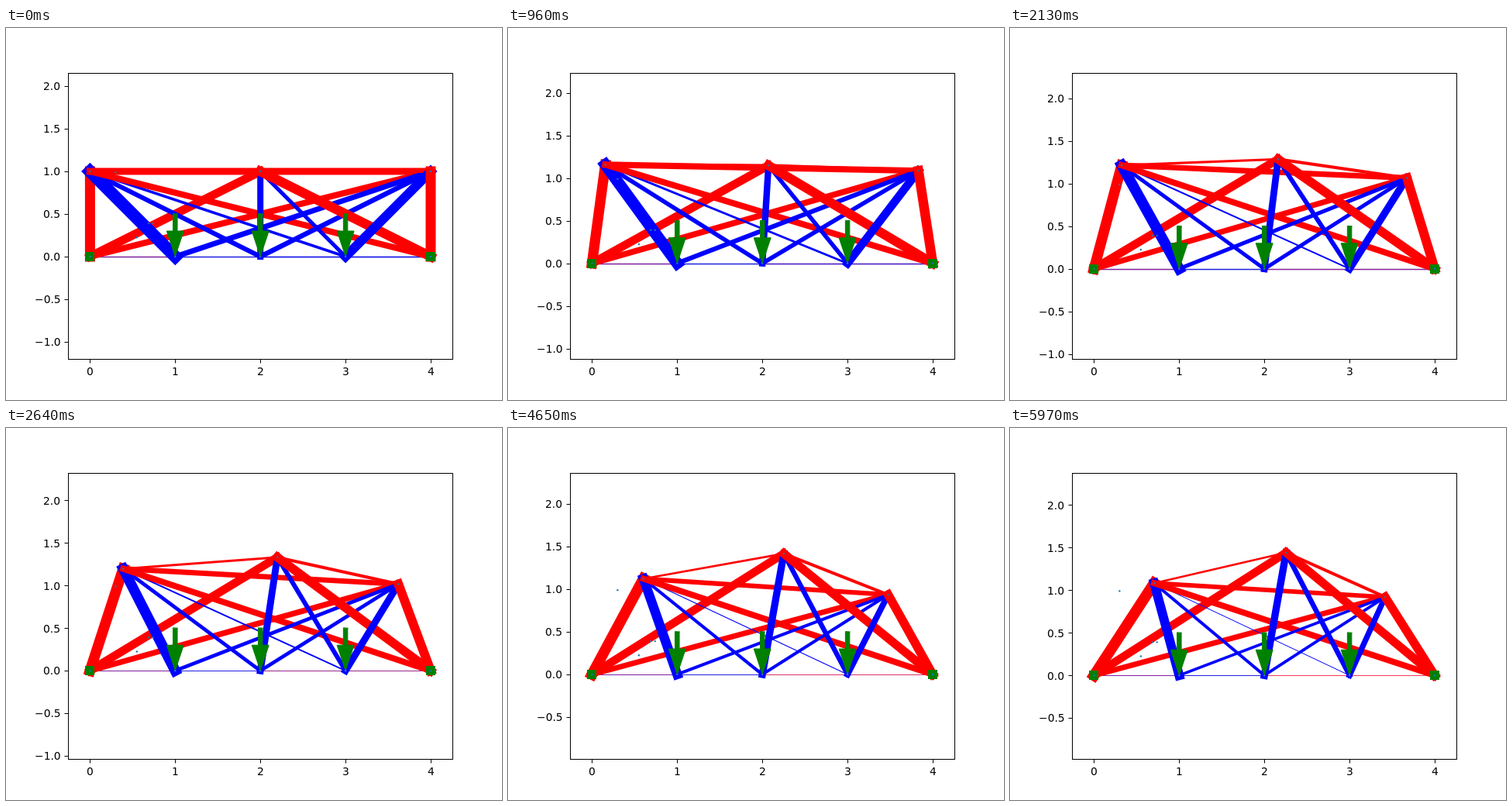
These frames come from a looping animation (640 by 480 pixels, 6 s). An HTML page with a canvas:

```html
<!DOCTYPE html>
<html>
<head>
<meta charset="utf-8">
<style>
html, body { margin: 0; width: 640px; height: 480px; overflow: hidden; background: #fff; }
canvas { display: block; }
</style>
</head>
<body>
<canvas id="stage" width="640" height="480"></canvas>
<script>
const ctx = document.getElementById('stage').getContext('2d');
const UNIT = 109.9, LOOP = 6000, STEP = 30;

// Key points of the free joints, in axis units
const paths = {
  A: [[0, 1], [.235, 1.21], [.47, 1.17], [.706, 1.083]],
  B: [[2, 1], [2.11, 1.218], [2.235, 1.376], [2.255, 1.441]],
  C: [[4, 1], [3.754, 1.105], [3.561, .968], [3.418, .92]]
};

// Bars in painting order: ends, colour, first and last width
const bars = [
  ['0A', 'red', 13, 14], ['0B', 'red', 11, 10.5], ['0C', 'red', 8, 7],
  ['A1', 'blue', 16, 12], ['A2', 'blue', 6, 4], ['AB', 'red', 4, 2.5],
  ['A3', 'blue', 3.5, 1], ['A4', 'red', 8, 8], ['AC', 'red', 9, 5.8],
  ['1C', 'blue', 7, 3.6], ['2B', 'blue', 8, 9.4], ['2C', 'blue', 6.4, 3.8],
  ['B3', 'blue', 5, 6.5], ['B4', 'red', 12.5, 11], ['BC', 'red', 4, 4],
  ['3C', 'blue', 12, 7.3], ['4C', 'red', 13, 11.3]
];
const specks = [[.3, .99], [.55, .225], [.69, .39], [.74, .39]];

const mix = (a, b, f) => a + (b - a) * f;
const easeOut = (f, bend) => f * (1 + bend - bend * f);
const snap = v => Math.round(v) + .5;

// Catmull-Rom spline through evenly spaced values, s from 0 to 1
function spline(v, s) {
  const n = v.length - 1, i = Math.min(n - 1, Math.floor(s * n)), f = s * n - i;
  const a = v[i], b = v[i + 1];
  const m0 = i ? (b - v[i - 1]) / 2 : b - a;
  const m1 = i < n - 1 ? (v[i + 2] - a) / 2 : b - a;
  return mix(a, b, f * f * (3 - 2 * f)) + f * (1 - f) * (m0 * (1 - f) - m1 * f);
}

function line(x1, y1, x2, y2, color, width) {
  ctx.strokeStyle = color;
  ctx.lineWidth = width;
  ctx.beginPath();
  ctx.moveTo(x1, y1);
  ctx.lineTo(x2, y2);
  ctx.stroke();
}

function draw(t) {
  const move = easeOut(t / (LOOP - STEP), .45);
  const load = easeOut(move, .4);

  const nodes = {};
  for (let i = 0; i < 5; i++) nodes[i] = [i, 0];
  for (const name in paths)
    nodes[name] = [0, 1].map(axis => spline(paths[name].map(p => p[axis]), move));

  // The view stays centred on the height of the truss
  const peak = Math.max(nodes.A[1], nodes.B[1], nodes.C[1]);
  const base = 242.6 + 110 * (peak / 2 - .024);
  const X = x => 328.2 + UNIT * (x - 2);
  const Y = y => base - UNIT * y;

  ctx.fillStyle = '#fff';
  ctx.fillRect(0, 0, 640, 480);

  ctx.save();
  ctx.beginPath();
  ctx.rect(80, 58, 496, 369);
  ctx.clip();

  const chord = (a, b, color) =>
    line(X(a), snap(base), X(b), snap(base), color, mix(1.6, 1, load));
  ctx.lineCap = 'butt';
  chord(0, 1, '#8020a0');
  chord(1, 2, '#2020e0');
  chord(2, 4, `rgb(${240 * load}, ${60 * load}, ${mix(230, 90, load)})`);

  ctx.lineCap = 'square';
  for (const [ends, color, first, last] of bars) {
    const [p, q] = [...ends].map(name => nodes[name]);
    line(X(p[0]), Y(p[1]), X(q[0]), Y(q[1]), color, mix(first, last, load));
  }

  ctx.fillStyle = ctx.strokeStyle = 'green';
  ctx.lineWidth = 1;
  for (const x of [0, 4]) ctx.fillRect(Math.round(X(x)) - 6, Math.round(base) - 6, 12, 12);
  for (const x of [1, 2, 3]) {
    const half = [[.025, .5], [.025, .3], [.1, .3], [0, 0]];
    const mirror = half.slice(0, 3).reverse().map(([dx, y]) => [-dx, y]);
    ctx.beginPath();
    for (const [dx, y] of [...half, ...mirror]) ctx.lineTo(X(x + dx), Y(y));
    ctx.closePath();
    ctx.fill();
    ctx.stroke();
  }

  ctx.fillStyle = '#1f77b4';
  for (const [x, y] of [...Object.values(nodes), ...specks]) {
    ctx.beginPath();
    ctx.arc(X(x), Y(y), 1.2, 0, 7);
    ctx.fill();
  }
  ctx.restore();

  ctx.lineCap = 'butt';
  ctx.strokeStyle = ctx.fillStyle = '#000';
  ctx.lineWidth = 1;
  ctx.strokeRect(80.5, 58.5, 496, 369);
  ctx.font = '13.89px "DejaVu Sans", sans-serif';
  for (let x = 0; x < 5; x++) {
    line(snap(X(x)), 428, snap(X(x)), 432.5, '#000', 1);
    ctx.fillText(x, Math.round(X(x) - 4.4), 448);
  }
  for (let y = -1; y <= 2; y += .5) {
    const py = Y(y);
    if (py > 427.3) continue;
    line(75.5, snap(py), 80, snap(py), '#000', 1);
    const label = y.toFixed(1).replace('-', '\u2212');
    const left = Math.round(70.3 - ctx.measureText(label).width);
    ctx.fillText(label, left, Math.round(py + 5.3));
  }
}

const start = performance.now();
function tick() {
  const t = (performance.now() - start) % LOOP;
  draw(Math.floor(t / STEP) * STEP);
  requestAnimationFrame(tick);
}
tick();
</script>
</body>
</html>
```
